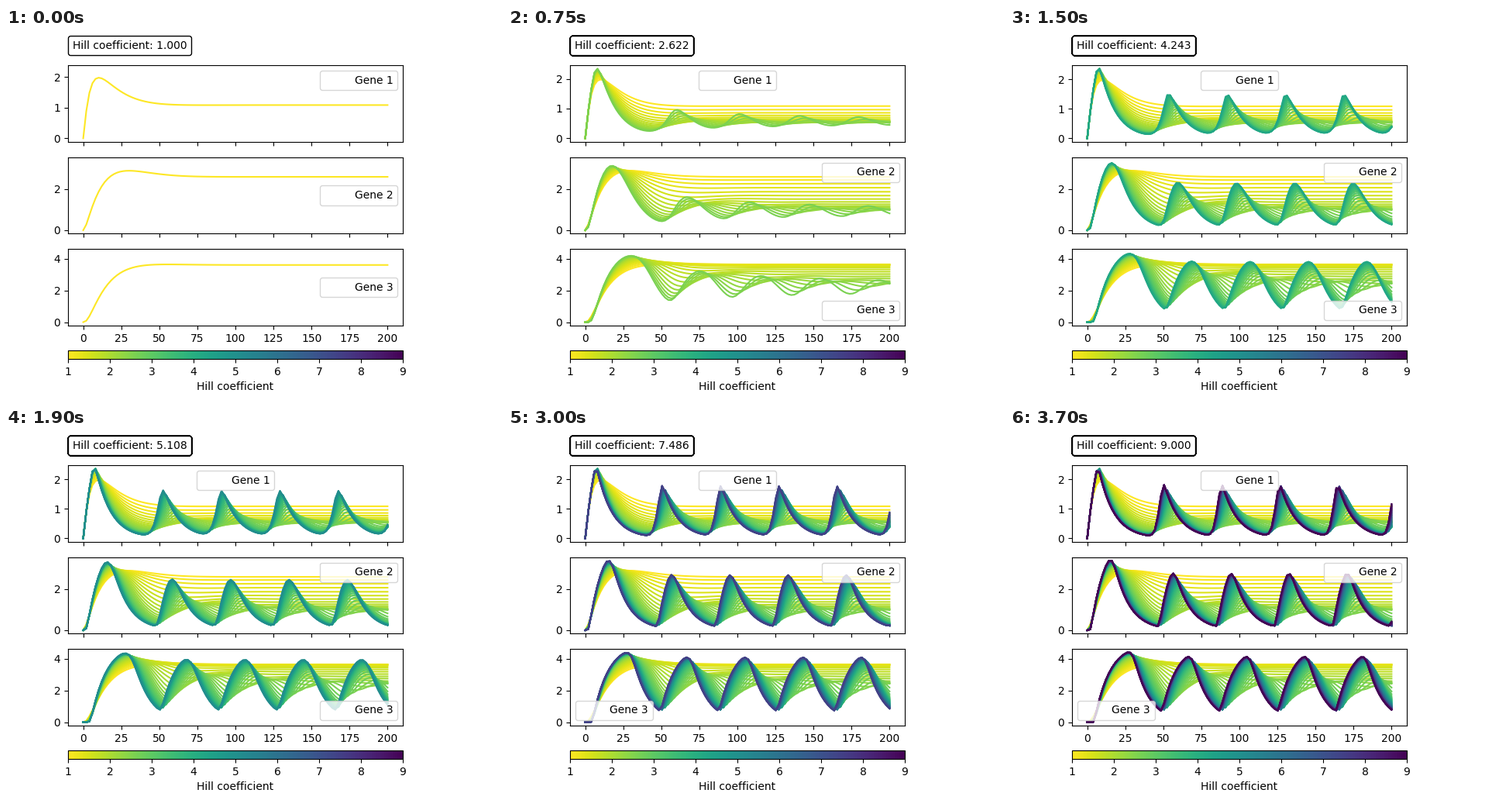
A matplotlib script that plays this animation: 640x480 px, repeating every 3.75 s.

```python
import numpy as np
import matplotlib.pyplot as plt
from matplotlib.animation import FuncAnimation
from matplotlib.cm import ScalarMappable
from matplotlib.colors import Normalize
from matplotlib.offsetbox import AnchoredText

FRAMES = 75
INTERVAL = 50
RATE, DECAY = 0.5, 0.1
SUBSTEPS = 30

hill = np.linspace(1, 9, FRAMES)
time = np.linspace(0, 200, 100)


def slope(g):
    """Gene 3 represses gene 1, which activates gene 2, which activates gene 3."""
    p = np.maximum(g, 0) ** hill
    made = np.array([1 / (1 + p[2]), p[0] / (1 + p[0]), p[1] / (1 + p[1])])
    return RATE * made - DECAY * g


def simulate():
    """Levels as an array of (time, gene, hill coefficient), by Runge-Kutta."""
    h = (time[1] - time[0]) / SUBSTEPS
    g = np.zeros((3, FRAMES))
    out = [g]
    for _ in time[1:]:
        for _ in range(SUBSTEPS):
            a = slope(g)
            b = slope(g + h / 2 * a)
            c = slope(g + h / 2 * b)
            d = slope(g + h * c)
            g = g + h / 6 * (a + 2 * b + 2 * c + d)
        out.append(g)
    return np.array(out)


levels = simulate()
peaks = levels.max(axis=0)
shades = ScalarMappable(Normalize(1, 9), "viridis_r")

fig, axes = plt.subplots(3, 1, sharex=True, figsize=(6.4, 4.8), dpi=100)
fig.subplots_adjust(left=0.125, right=0.8, bottom=0.2, top=0.9, hspace=0.2)

curves = []
for k, ax in enumerate(axes):
    # The unseen last curve fixes the range and steers the legend.
    ax.plot(time, levels[:, k, -1], alpha=0, label=f"Gene {k + 1}")
    curves.append([ax.plot([], [], color=shades.to_rgba(n))[0] for n in hill])
    ax.legend(loc="best")
axes[-1].set_xlim(-10, 210)

cax = fig.add_axes([0.125, 0.11, 0.675, 0.0225])
fig.colorbar(shades, cax=cax, orientation="horizontal", label="Hill coefficient")


def make_tag(n):
    tag = AnchoredText(f"Hill coefficient: {n:.3f}", loc="lower left",
                       prop=dict(size=10), borderpad=0, frameon=True,
                       bbox_to_anchor=(0, 1.13),
                       bbox_transform=axes[0].transAxes)
    tag.patch.set_boxstyle("round,pad=0.,rounding_size=0.2")
    return axes[0].add_artist(tag)


tags = [make_tag(n) for n in hill]


def draw(i):
    for k, ax in enumerate(axes):
        for j, line in enumerate(curves[k]):
            if j <= i:
                line.set_data(time, levels[:, k, j])
            else:
                line.set_data([], [])
        top = max(peaks[k, -1], peaks[k, :i + 1].max())
        ax.set_ylim(-0.05 * top, 1.05 * top)
    # Tags pile up, so the box outline thickens.
    for j, tag in enumerate(tags):
        tag.set_visible(j <= i)


anim = FuncAnimation(fig, draw, frames=FRAMES, interval=INTERVAL,
                     repeat=True, repeat_delay=0)
plt.show()
```
